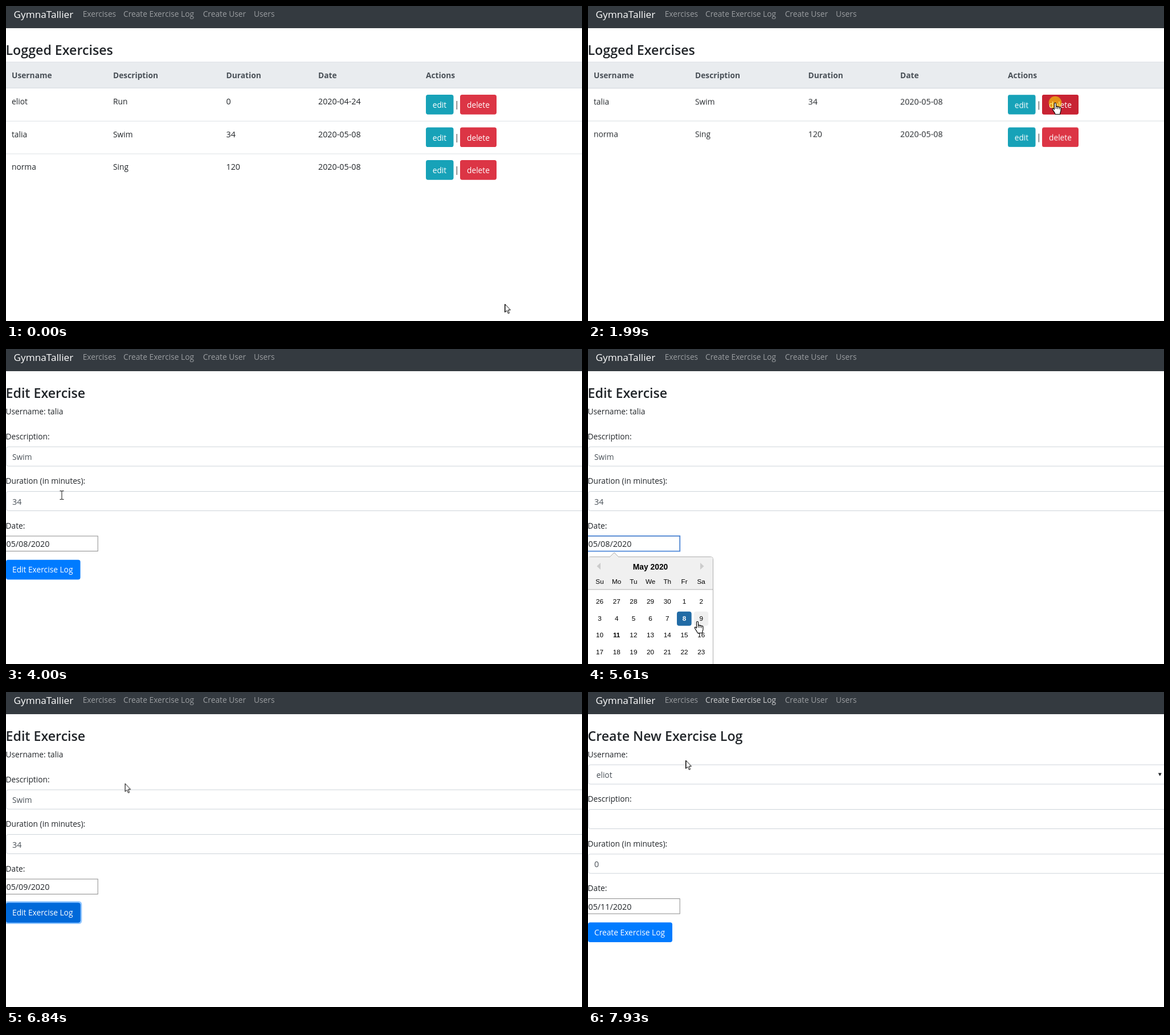
Recreate the animation shown at these times as an HTML page. Size 1011x554 px, loop 8 s.

```html
<!DOCTYPE html>
<html lang="en">
<head>
<meta charset="utf-8">
<title>Exercise log</title>
<style>
html, body { margin: 0; width: 100%; height: 100%; overflow: hidden; background: #fff; }
svg { display: block; width: 1011px; height: 554px; font: 13.75px "Open Sans", "Noto Sans", sans-serif; fill: #212529; }
.brand { font-size: 17.2px; fill: #fff; }
.link { fill: #fff; fill-opacity: .5; }
.lit { fill-opacity: .75; }
.title { font-size: 23.2px; font-weight: 600; }
.head { font-weight: 700; fill: #495057; }
.num { font-size: 14.3px; }
.value { fill: #495057; }
.white { fill: #fff; }
.line { fill: #dee2e6; }
.field { fill: #fff; stroke: #ced4da; }
.date { fill: #fff; stroke: #8c8c8c; }
.cal { font: 11.75px "Liberation Sans", Arial, sans-serif; text-anchor: middle; fill: #000; }
.month { font-size: 13.85px; }
.bold { font-weight: 700; }
.ink { fill: #fff; stroke: #000; stroke-linejoin: round; }

/* one percent is 80 ms; .cut parts switch hard, .fade parts ease like hover */
.cut { opacity: 0; animation: 8s step-end infinite; }
.fade { opacity: 0; animation: 8s linear infinite; }
.list { animation-name: list; }
.gone { opacity: 1; animation-name: gone; }
.rise { animation: rise 8s step-end infinite; }
.before { opacity: 1; animation-name: before; }
.after { animation-name: after; }
.edit-on { fill: #138496; animation-name: edit-on; }
.delete-on { fill: #c82333; animation-name: delete-on; }
.form { animation-name: form; }
.old { opacity: 1; animation-name: old; }
.new { animation-name: new; }
.focus { animation-name: focus; }
.calendar { animation-name: calendar; }
.day-on { animation-name: day-on; }
.save-on { animation-name: save-on; }
.ring { animation-name: ring; }
.create { animation-name: create; }
.nav-off { opacity: 1; animation-name: nav-off; }
.nav-on { animation-name: nav-on; }
.cursor { animation: path 8s linear infinite; }
.arrow { opacity: 1; animation-name: arrow; }
.hand { animation-name: hand; }
.beam { animation-name: beam; }
.click { animation-name: click; }

@keyframes list { 0%, 86.5% { opacity: 1 } 37.375%, 95.25% { opacity: 0 } }
@keyframes gone { 24.875%, 100% { opacity: 0 } }
@keyframes rise { 24.875%, 100% { transform: translateY(-57.5px) } }
@keyframes before { 60%, 100% { opacity: 0 } }
@keyframes after { 60%, 100% { opacity: 1 } }
@keyframes edit-on {
  0%, 12.25% { opacity: 0 } 14%, 20% { opacity: 1 } 21.9%, 30% { opacity: 0 }
  32% { opacity: 1 } 36.3% { opacity: 1; fill: #138496 }
  36.37%, 37.37% { opacity: 1; fill: #117a8b } 37.375%, 100% { opacity: 0 }
}
@keyframes delete-on { 0%, 20.5% { opacity: 0 } 22%, 29.5% { opacity: 1 } 31%, 100% { opacity: 0 } }
@keyframes form { 37.375% { opacity: 1 } 86.5% { opacity: 0 } }
@keyframes old { 73% { opacity: 0 } }
@keyframes new { 73% { opacity: 1 } }
@keyframes focus { 61.5% { opacity: 1 } 78.75% { opacity: 0 } }
@keyframes calendar { 62.5% { opacity: 1 } 73.5% { opacity: 0 } }
@keyframes day-on { 68% { opacity: 1 } 73.5% { opacity: 0 } }
@keyframes save-on { 0%, 76% { opacity: 0 } 78%, 100% { opacity: 1 } }
@keyframes ring { 79% { opacity: 1 } 86.5% { opacity: 0 } }
@keyframes create { 95.25%, 100% { opacity: 1 } }
@keyframes nav-off { 90.4%, 100% { opacity: 0 } }
@keyframes nav-on { 90.4%, 100% { opacity: 1 } }
@keyframes arrow {
  0%, 63.125%, 73%, 81%, 95.25% { opacity: 1 }
  12%, 66.5%, 76.5%, 90.4% { opacity: 0 }
}
@keyframes hand {
  12%, 66.5%, 76.5%, 90.4% { opacity: 1 }
  0%, 37.375%, 73%, 81%, 95.25% { opacity: 0 }
}
@keyframes beam { 37.375% { opacity: 1 } 63.125% { opacity: 0 } }
@keyframes click {
  23.875%, 36.375%, 61.5%, 71.5%, 78.75%, 93.375% { opacity: 1 }
  0%, 25.875%, 38.5%, 63.5%, 73.5%, 80.75%, 95.4% { opacity: 0 }
}
@keyframes path {
  0%, .9% { transform: translate(875.5px, 524px) }
  3% { transform: translate(640px, 390px) }
  5% { transform: translate(330px, 230px) }
  6.5% { transform: translate(213px, 110px) }
  8% { transform: translate(330px, 73px) }
  10.5% { transform: translate(679px, 166px) }
  12.4% { transform: translate(735px, 169px) }
  15.25%, 19.1% { transform: translate(741.5px, 169px) }
  22%, 28.75% { transform: translate(820px, 170px) }
  32.6%, 37.3% { transform: translate(753.5px, 178.5px) }
  37.4%, 41.4% { transform: translate(754px, 180px) }
  43.5% { transform: translate(420px, 225px) }
  45% { transform: translate(110px, 250px) }
  46.1%, 48% { transform: translate(19px, 196px) }
  50% { transform: translate(98px, 257px) }
  53.9%, 57.6% { transform: translate(70px, 276px) }
  60.6%, 62.8% { transform: translate(60px, 342px) }
  67.25% { transform: translate(180px, 470px) }
  70.1%, 73.5% { transform: translate(192px, 479px) }
  77.9%, 79.5% { transform: translate(80px, 388px) }
  85.5% { transform: translate(208.5px, 161px) }
  88.5% { transform: translate(225px, 62px) }
  91.25%, 95.25% { transform: translate(265px, 22px) }
  99.125%, 100% { transform: translate(171.5px, 120px) }
}
</style>
</head>
<body>
<svg viewBox="0 0 1011 554">
  <defs>
    <g id="edit"><rect x="737" y="156" width="48.5" height="34.7" rx="3.7"/><text class="white" x="748.7" y="179">edit</text></g>
    <g id="delete"><rect x="797" y="156" width="64" height="34.7" rx="3.7"/><text class="white" x="809" y="179">delete</text></g>
    <g id="actions">
      <use href="#edit" fill="#17a2b8"/><text x="787.5" y="178">|</text><use href="#delete" fill="#dc3545"/>
    </g>
    <rect id="input" class="field" x=".5" y="172" width="1020" height="34" rx="3.7"/>
    <rect id="datebox" class="date" x="-1" y="329" width="162.2" height="26.5"/>
  </defs>

  <rect width="1011" height="39" fill="#343a40"/>
  <text class="brand" x="13.5" y="21">GymnaTallier</text>
  <text class="link" x="134.7" y="19">Exercises</text>
  <g class="cut nav-off"><text class="link" x="206" y="19">Create Exercise Log</text></g>
  <g class="cut nav-on"><text class="link lit" x="206" y="19">Create Exercise Log</text></g>
  <text class="link" x="345.7" y="19">Create User</text>
  <text class="link" x="435" y="19">Users</text>

  <g class="cut list">
    <text class="title" x="-.5" y="86">Logged Exercises</text>
    <g class="cut gone">
      <text x="10" y="173">eliot</text><text x="188" y="173">Run</text>
      <text class="num" x="386.5" y="173">0</text><text class="num" x="548" y="173">2020-04-24</text>
      <use href="#actions"/>
    </g>
    <g class="rise">
      <g transform="translate(0 57.5)">
        <rect class="line" y="144.5" width="1011" height="1"/>
        <text x="10" y="173">talia</text><text x="188" y="173">Swim</text>
        <text class="num" x="386.5" y="173">34</text>
        <text class="num cut before" x="548" y="173">2020-05-08</text>
        <text class="num cut after" x="548" y="173">2020-05-09</text>
        <use href="#actions"/>
      </g>
      <g transform="translate(0 115)">
        <rect class="line" y="144.5" width="1011" height="1"/>
        <text x="10" y="173">norma</text><text x="188" y="173">Sing</text>
        <text class="num" x="386.5" y="173">120</text><text class="num" x="548" y="173">2020-05-08</text>
        <use href="#actions"/>
      </g>
    </g>
    <rect y="98" width="1011" height="47" fill="#e9ecef"/>
    <rect class="line" y="98" width="1011" height="1"/>
    <rect class="line" y="143.5" width="1011" height="1.5"/>
    <g class="head">
      <text x="10" y="127">Username</text><text x="188" y="127">Description</text>
      <text x="386.5" y="127">Duration</text><text x="548" y="127">Date</text><text x="737" y="127">Actions</text>
    </g>
    <use href="#edit" class="fade edit-on"/>
    <use href="#delete" class="fade delete-on"/>
  </g>

  <g class="cut form">
    <text class="title" x="-.5" y="86">Edit Exercise</text>
    <text x="-.5" y="115">Username: talia</text>
    <text x="-.5" y="159">Description:</text>
    <use href="#input"/><text class="value" x="11" y="195">Swim</text>
    <text x="-.5" y="237">Duration (in minutes):</text>
    <use href="#input" y="78.5"/><text class="value num" x="11" y="274">34</text>
    <text x="-.5" y="316">Date:</text>
    <use href="#datebox"/>
    <rect class="cut focus" x="-2" y="328.8" width="163.3" height="26.8" fill="none" stroke="#4a85d8" stroke-width="1.7"/>
    <text class="num cut old" x=".5" y="348">05/08/2020</text>
    <text class="num cut new" x=".5" y="348">05/09/2020</text>
    <rect class="cut ring" x="-2.7" y="368" width="136" height="40" rx="5.5" fill="#93c7ff"/>
    <rect y="370.7" width="130.5" height="34.7" rx="3.7" fill="#007bff"/>
    <rect class="fade save-on" y="370.7" width="130.5" height="34.7" rx="3.7" fill="#0069d9"/>
    <text class="white" x="11" y="393">Edit Exercise Log</text>

    <g class="cut calendar">
      <g class="cal">
        <rect x="-.5" y="365.5" width="220" height="240" rx="4" fill="#fff" stroke="#aeaeae"/>
        <path d="M0 423V366H216q3 0 3 3V423Z" fill="#f0f0f0"/>
        <path d="M0 423H219" stroke="#aeaeae"/>
        <path d="M38 366L46 358L54 366" fill="#f0f0f0" stroke="#aeaeae"/>
        <path d="M22 376V388L15.5 382ZM197 376V388L203.5 382Z" fill="#ccc"/>
        <text class="month bold" x="109.5" y="388">May 2020</text>
        <rect x="156" y="461.7" width="25.7" height="25" rx="4" fill="#216ba5"/>
        <rect class="cut day-on" x="186" y="461.7" width="25.3" height="25" rx="4" fill="#f0f0f0"/>
        <g id="days"></g>
      </g>
    </g>
  </g>

  <g class="cut create">
    <text class="title" x="-.5" y="86">Create New Exercise Log</text>
    <text x="-.5" y="115">Username:</text>
    <use href="#input" y="-44"/><text class="value" x="14.7" y="151">eliot</text>
    <path d="M1000.8 142.5H1006.8L1003.8 148Z"/>
    <text x="-.5" y="193">Description:</text>
    <use href="#input" y="34.5"/>
    <text x="-.5" y="272">Duration (in minutes):</text>
    <use href="#input" y="113"/><text class="value num" x="11" y="308">0</text>
    <text x="-.5" y="350">Date:</text>
    <use href="#datebox" y="34.5"/><text class="num" x=".5" y="382.5">05/11/2020</text>
    <rect y="405.2" width="148" height="34.7" rx="3.7" fill="#007bff"/>
    <text class="white" x="11" y="428">Create Exercise Log</text>
  </g>

  <g class="cursor">
    <circle class="cut click" r="11.3" fill="#ff0" fill-opacity=".5"/>
    <path class="cut arrow ink" d="M.5 .5V14.5L3.6 11.6L6 16.8L8 15.9L5.8 10.7H10Z"/>
    <g class="cut hand ink">
      <path stroke-width="1.1" d="M-1.5 12V1.7a1.5 1.5 0 0 1 3 0V7.5c.2-1.3 2.8-1.2 3 .3c.4-1 2.7-.8 2.9.6c.5-.8 2.6-.4 2.6 1.2V14c0 2-1.5 3-1.5 6.5H.2C-.3 17.5-2.8 15.5-4.7 11.8C-5.3 10.3-3.6 9.6-2.6 10.8Z"/>
      <path d="M1.5 7.5V11M4.5 7.8V11.3M7.4 8.4V11.6" fill="none"/>
    </g>
    <path class="cut beam" fill="none" stroke="#111" d="M-3.5 -7.5H-.8L0 -6.8L.8 -7.5H3.5M0 -7V7M-3.5 7.5H-.8L0 6.8L.8 7.5H3.5"/>
  </g>
</svg>
<script>
const days = document.getElementById('days');

function cell(label, col, y, cls = '') {
  const text = document.createElementNS('http://www.w3.org/2000/svg', 'text');
  text.setAttribute('x', 20.5 + col * 29.7);
  text.setAttribute('y', y);
  text.setAttribute('class', cls);
  text.textContent = label;
  days.append(text);
}

['Su', 'Mo', 'Tu', 'We', 'Th', 'Fr', 'Sa'].forEach((name, col) => cell(name, col, 412.5));
for (let i = 0; i < 28; i++) {
  const day = i < 5 ? 26 + i : i - 4;
  const cls = i === 12 ? 'bold white' : i === 15 ? 'bold' : '';
  cell(day, i % 7, 448 + Math.floor(i / 7) * 29.6, cls);
}
</script>
</body>
</html>
```
